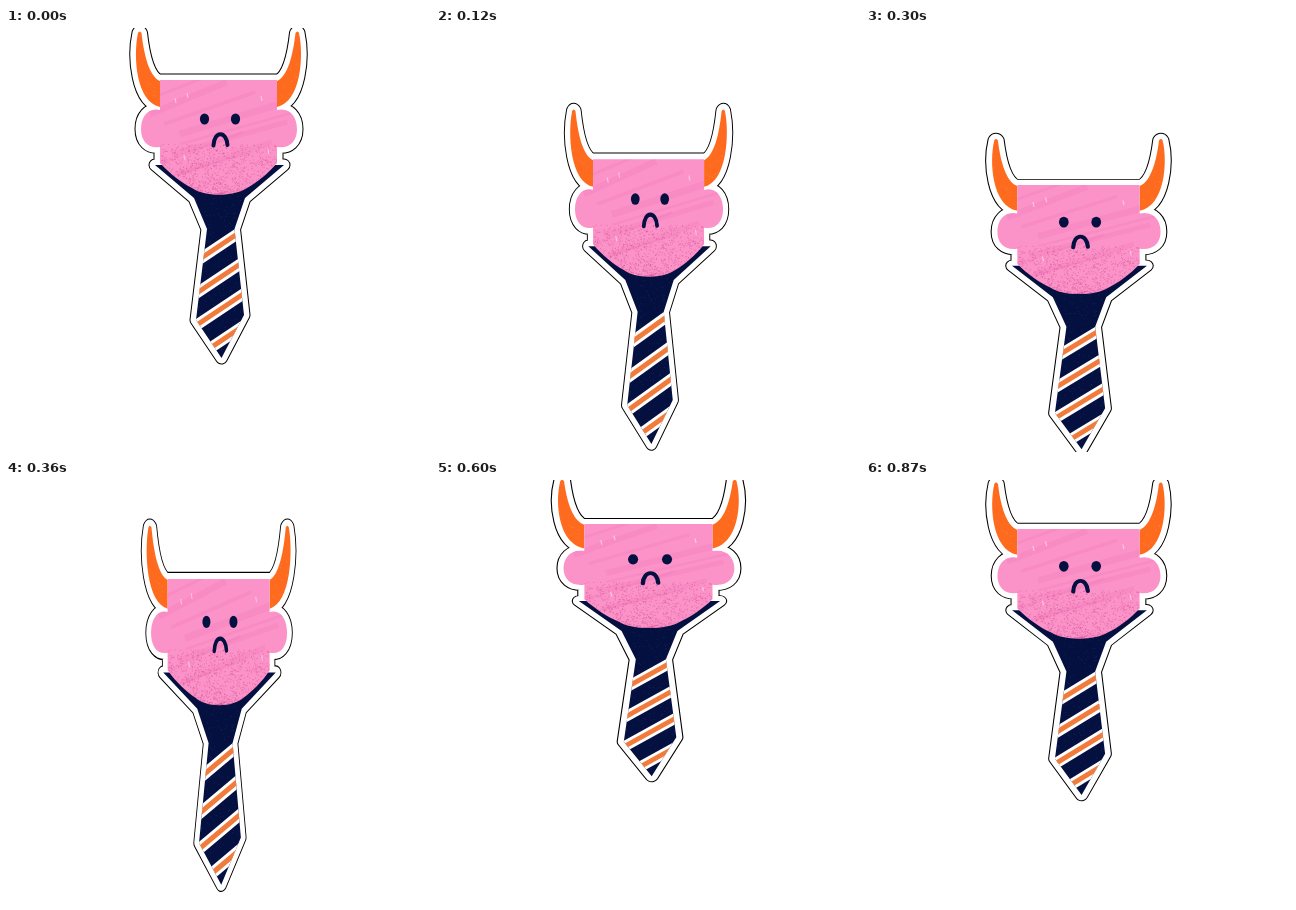
These frames come from a looping animation (424 px wide and 424 px high, 0.9 s). An HTML page with a canvas:

```html
<!DOCTYPE html>
<html>
<head>
<meta charset="utf-8">
<style>
  html, body { margin: 0; width: 100%; height: 100%; overflow: hidden; background: #fff; }
  canvas { display: block; }
</style>
</head>
<body>
<canvas id="stage" width="424" height="424"></canvas>
<script>
const ctx = document.getElementById('stage').getContext('2d');
const NAVY = '#04103f', ORANGE = '#ff6b1e', STRIPE = '#f27a3a', PINK = '#fc93c8';
const LOOP = 900, STEP = 30, TOP_TIME = 690;
const CENTER = { x: 213.5, y: 167 };

// Steps away from the highest point: [step, centre y, scale x, scale y]
const poses = [
  [0, 145, 1.145, .868], [2, 148.3, 1.095, .908], [6, 159, 1.045, .957],
  [7, 167, 1, 1], [8, 183.5, .957, 1.034], [10, 225.5, .872, 1.1],
  [11, 249, .949, 1.025], [14, 301, 1.24, .8]
];

const head = new Path2D(`M154 52H271V82C284 79 291 89 291 101S284 121 271 119V135
  C262 146 250 155 241 160C228 169 198 169 186 160C176 155 164 146 154 135V119
  C142 121 135 113 135 101S142 79 154 82Z`);
const leftHorn = new Path2D('M132 5C127 28 130 74 154 79V53C143 48 138 27 135.500 5Q133.500 2 132 5Z');
const horns = new Path2D(leftHorn);
horns.addPath(leftHorn, new DOMMatrix([-1, 0, 0, 1, 425, 0]));
const tie = new Path2D('M149 137H278L239 170L228.500 201L238 287L215.500 330L190 292L201 201L188 170Z');
const silhouette = new Path2D();
[head, horns, tie].forEach(part => silhouette.addPath(part));

function randomFrom(seed) {
  return () => (seed = (seed * 16807) % 2147483647) / 2147483647;
}

function line(x1, y1, x2, y2, width, color) {
  ctx.lineWidth = width;
  ctx.strokeStyle = color;
  ctx.beginPath();
  ctx.moveTo(x1, y1);
  ctx.lineTo(x2, y2);
  ctx.stroke();
}

function outline(width, color) {
  ctx.lineWidth = width;
  ctx.strokeStyle = color;
  ctx.stroke(silhouette);
}

function fillClipped(path, color, drawDetails) {
  ctx.save();
  ctx.fillStyle = color;
  ctx.fill(path);
  ctx.clip(path);
  drawDetails(randomFrom(77));
  ctx.restore();
}

function speckle(random, count, color, place) {
  ctx.fillStyle = color;
  for (let i = 0; i < count; i++) {
    const [x, y] = place(random);
    ctx.fillRect(x, y, 1, 1);
  }
}

function tieDetails(random) {
  speckle(random, 260, 'rgba(50,70,140,.35)', r => [188 + 52 * r(), 165 + 165 * r()]);
  for (let i = 0; i < 4; i++) {
    const y = 217.5 + 32 * i;
    line(184, y + 20, 244, y - 20, 11, '#fff');
    line(184, y + 20, 244, y - 20, 5, STRIPE);
  }
}

function headDetails(random) {
  for (let i = 0; i < 9; i++) {
    const x = 130 + 45 * random(), y = 76 + i * 10;
    line(x, y, x + 75 + 60 * random(), y - 32, 2 + 5 * random(), 'rgba(232,108,178,.22)');
  }
  speckle(random, 1200, 'rgba(205,75,145,.45)', r => [154 + 117 * r(), 166 - 50 * r() ** 1.6]);
  for (const [x, y] of [[169, 70], [181, 65], [262, 121], [178, 127], [255, 68]])
    line(x, y, x + 1, y + 5, 1.2, 'rgba(255,205,232,.8)');
}

function drawFace() {
  ctx.fillStyle = NAVY;
  for (const x of [198.5, 229.5]) {
    ctx.beginPath();
    ctx.ellipse(x, 91, 4.6, 5.6, 0, 0, 2 * Math.PI);
    ctx.fill();
  }
  ctx.lineWidth = 4;
  ctx.lineCap = 'round';
  ctx.strokeStyle = NAVY;
  ctx.stroke(new Path2D('M207.500 117.500C208 102.500 220.500 102.500 221.500 117'));
  ctx.lineCap = 'butt';
}

function poseAt(step) {
  const next = Math.max(1, poses.findIndex(p => p[0] >= step));
  const a = poses[next - 1], b = poses[next];
  const u = (step - a[0]) / (b[0] - a[0]);
  return a.map((v, i) => v + (b[i] - v) * u);
}

function draw(now) {
  const time = Math.floor(now % LOOP / STEP) * STEP + STEP / 2;
  const gap = Math.abs(time - TOP_TIME);
  const step = Math.floor(Math.min(gap, LOOP - gap) / STEP);
  const [, y, scaleX, scaleY] = poseAt(step);

  ctx.setTransform(1, 0, 0, 1, 0, 0);
  ctx.fillStyle = '#fff';
  ctx.fillRect(0, 0, 424, 424);
  ctx.translate(CENTER.x, y);
  ctx.scale(scaleX, scaleY);
  ctx.translate(-CENTER.x, -CENTER.y);

  ctx.lineJoin = 'round';
  outline(13, '#000');
  outline(11, '#fff');
  fillClipped(tie, NAVY, tieDetails);
  fillClipped(horns, ORANGE, random =>
    speckle(random, 160, 'rgba(255,150,90,.5)', r => [128 + 169 * r(), 4 + 75 * r()]));
  fillClipped(head, PINK, headDetails);
  drawFace();
  requestAnimationFrame(() => draw(performance.now() - start));
}

const start = performance.now();
draw(0);
</script>
</body>
</html>
```
